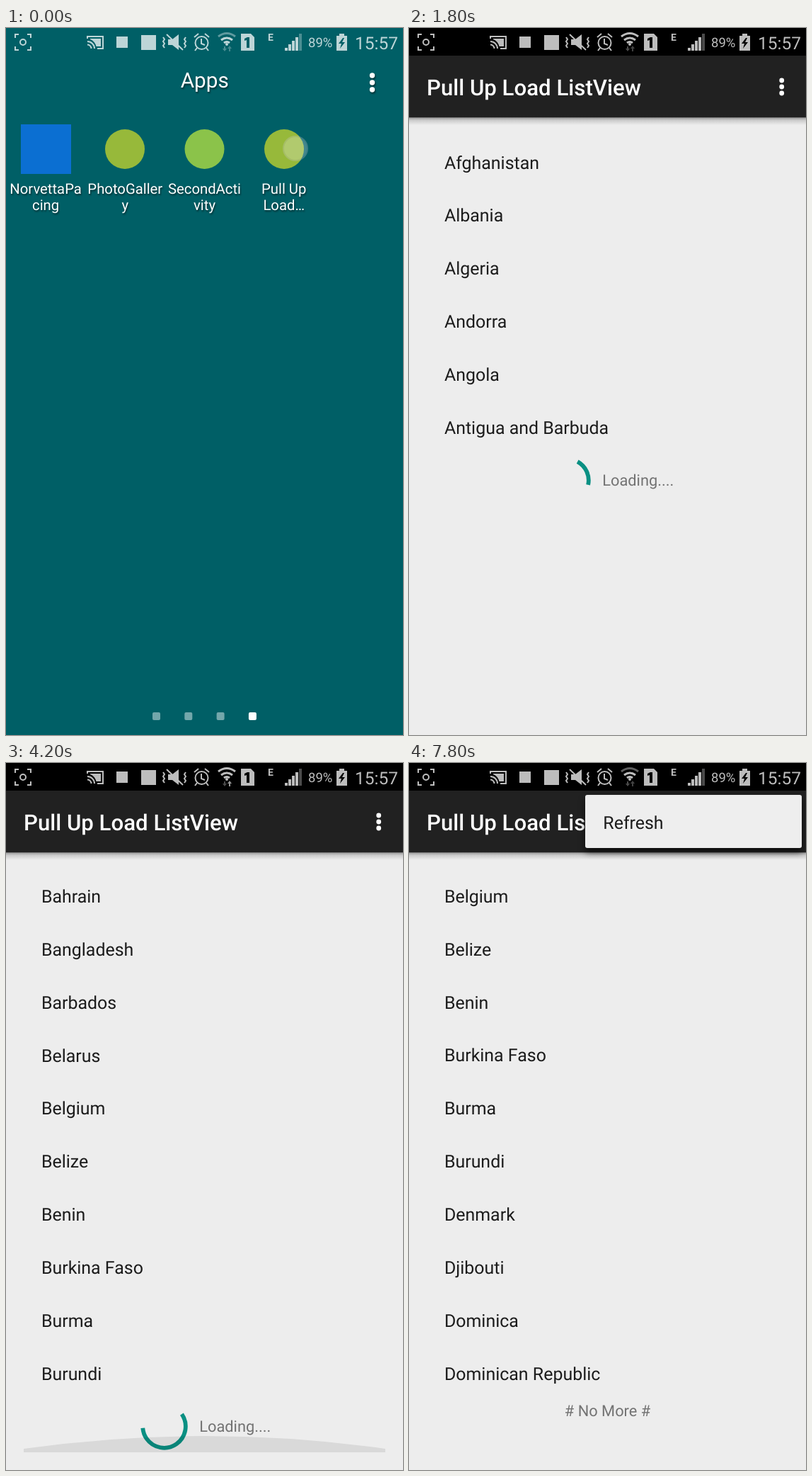
These frames come from a looping animation (561 px wide and 998 px high, 8 s). An HTML page:

```html
<!DOCTYPE html>
<html lang="en">
<head>
<meta charset="utf-8">
<title>Pull Up Load ListView</title>
<style>
  html, body { margin: 0; width: 100%; height: 100%; overflow: hidden; background: #005f66; }
  svg { display: block; }
  text { font-family: Roboto, sans-serif; white-space: pre; text-rendering: geometricPrecision; }
  #home text { fill: #fff; text-anchor: middle; font-size: 20.3px; }
  #home .shade { filter: drop-shadow(1px 2px 1px rgba(0, 0, 0, .5)); }
  #items text, #popup text { font-size: 24.95px; fill: #1c1c1c; }
  #footer text { font-size: 21.83px; fill: #737373; }
  #popup { filter: drop-shadow(0 6px 5px rgba(0, 0, 0, .6)); }
  #status { fill: #fff; stroke: none; opacity: .74; }
  #status .line { fill: none; stroke: #fff; stroke-width: 2; }
</style>
</head>
<body>
<svg width="561" height="998" viewBox="0 0 561 998">
  <defs>
    <linearGradient id="drop" x2="0" y2="1">
      <stop stop-opacity=".38"/><stop offset=".4" stop-opacity=".14"/><stop offset="1" stop-opacity="0"/>
    </linearGradient>
    <clipPath id="view"><path d="M25 151H536V973H25z"/></clipPath>
  </defs>

  <rect width="561" height="998" fill="#005f66"/>
  <g id="home">
    <g class="shade">
      <text x="280.700" y="83.500" style="font-size:29.7px">Apps</text>
      <g fill="#fff"><circle cx="517.500" cy="67" r="3.700"/><circle cx="517.500" cy="77" r="3.700"/><circle cx="517.500" cy="87" r="3.700"/></g>
      <g id="labels"></g>
    </g>
    <rect x="21" y="136" width="71" height="70" fill="#0b6fd2"/>
    <circle cx="168" cy="171" r="28" fill="#97b93a"/>
    <circle cx="280.500" cy="171" r="28" fill="#8bc34a"/>
    <circle cx="393" cy="171" r="28" fill="#97b93a"/>
    <g id="pages" fill="#fff"></g>
  </g>

  <g id="app">
    <rect width="561" height="1000" fill="#ededed"/>
    <g id="content">
      <g clip-path="url(#view)">
        <g id="items"></g>
        <g id="footer">
          <g id="loading">
            <circle id="spin" r="30.300" pathLength="1" fill="none" stroke="#0a9083" stroke-width="5.800"/>
            <text x="273.200" y="7.800">Loading....</text>
          </g>
          <text id="end" x="280.500" y="-14.200" text-anchor="middle"># No More #</text>
        </g>
        <path id="glow" d="M25 973V968Q280.500 932 536 968V973z" fill-opacity=".085"/>
      </g>
      <rect y="126" width="561" height="11" fill="url(#drop)"/>
      <rect y="39" width="561" height="87.300" fill="#212121"/>
      <svg x="493" y="39" width="68" height="87"><circle id="ripple" cx="34" cy="44" r="43" fill="#fff" fill-opacity=".2"/></svg>
      <text x="24.950" y="94.500" font-size="31.180" font-weight="500" fill="#fff">Pull Up Load ListView</text>
      <g fill="#fff"><circle cx="526.700" cy="74" r="3.400"/><circle cx="526.700" cy="83" r="3.400"/><circle cx="526.700" cy="92" r="3.400"/></g>
    </g>
    <rect width="561" height="39"/>
  </g>

  <g id="popup">
    <rect x="249" y="45" width="306" height="75" rx="3" fill="#eeeeee"/>
    <text x="274.300" y="92.500">Refresh</text>
  </g>

  <g id="status">
    <g class="line">
      <path d="M13 14V9h5M30 9h5v5M35 26v5h-5M18 31h-5v-5"/><circle cx="24" cy="20" r="4"/>
      <path d="M115 15V12H137V29H129M115 19a10 10 0 0 1 10 10M115 23.500a5.500 5.500 0 0 1 5.500 5.500"/>
      <path d="M222 13l2 3-2 3 2 3-2 3 2 3M254 13l-2 3 2 3-2 3 2 3-2 3M227 9L250 31"/>
      <circle cx="276.500" cy="21" r="9"/>
      <path d="M266 13l6-5M287 13l-6-5M276 15v7l5 2M270 28l-3 4M283 28l3 4"/>
      <path id="outer" d="M300 12q12-9 24 0" stroke-width="3"/>
      <path d="M304 17q8-6 16 0M308 21q4-3 8 0" stroke-width="3"/>
    </g>
    <path d="M119 15H134V26H127.500Q125.500 18.500 119 16z"/>
    <rect x="156" y="12" width="16" height="16"/>
    <rect x="191" y="10" width="21" height="21"/>
    <path d="M229 16h6l9-7v22l-9-7h-6z"/>
    <circle cx="312" cy="23" r="2"/>
    <path d="M309 33l-3-4h2v-3h2v3h2z" opacity=".4"/>
    <path id="up" d="M316 25l-3 4h2v4h2v-4h2z"/>
    <path fill-rule="evenodd" d="M332 8h14l5 5V32H332zM337 15l4-2h3V28h-4V17l-3 1z"/>
    <text x="370" y="18" font-size="14" font-weight="700">E</text>
    <path d="M394 28h4v4h-4zM399 23h4v9h-4zM404 18h4v14h-4zM409 13h4v19h-4z"/>
    <path d="M414 8h4v24h-4z" opacity=".4"/>
    <text x="427" y="27" font-size="18.500">89%</text>
    <path fill-rule="evenodd" d="M471 8h7v3h4V32H467V11h4zM476 14l-6 8h4l-2 7 7-9h-4l3-6z"/>
    <text x="493" y="30" font-size="24.500">15:57</text>
  </g>
  <circle id="touch" r="17" fill="#f8f8fa" fill-opacity=".9" stroke="#c8c8ce" stroke-width="2"/>
</svg>

<script>
const ROW = 74.85, FIRST = 189.5, LOOP = 8000;
const SCROLL_1 = 525.5, SCROLL_2 = SCROLL_1 + 4 * ROW;
const countries = ['Afghanistan', 'Albania', 'Algeria', 'Andorra', 'Angola', 'Antigua and Barbuda',
  'Bahamas, The', 'Bahrain', 'Bangladesh', 'Barbados', 'Belarus', 'Belgium', 'Belize', 'Benin',
  'Burkina Faso', 'Burma', 'Burundi', 'Denmark', 'Djibouti', 'Dominica', 'Dominican Republic'];
const labels = [['NorvettaPa', 'cing'], ['PhotoGaller', 'y'], ['SecondActi', 'vity'], ['Pull Up', 'Load…']];

const $ = id => document.getElementById(id);
const set = (id, attrs) => { for (const k in attrs) $(id).setAttribute(k, attrs[k]); };
const show = (id, on) => set(id, { visibility: on ? 'visible' : 'hidden' });
const clamp = x => Math.min(1, Math.max(0, x));

$('items').innerHTML = countries.map((c, i) => `<text x="49.900" y="${FIRST + 9 + i * ROW}">${c}</text>`).join('');
$('labels').innerHTML = labels.map((pair, i) => pair.map((s, j) =>
  `<text x="${56.1 + i * 112.2}" y="${234 + j * 23}">${s}</text>`).join('')).join('');
$('pages').innerHTML = [0, 1, 2, 3].map(i =>
  `<rect x="${207 + i * 45.3}" y="966" width="11" height="11" rx="2" opacity="${i < 3 ? 0.45 : 1}"/>`).join('');

// Piecewise linear track of time, value pairs
function track(t, ...keys) {
  for (let i = 2; i < keys.length; i += 2) {
    if (t < keys[i]) {
      const k = clamp((t - keys[i - 2]) / (keys[i] - keys[i - 2]));
      return keys[i - 1] + k * (keys[i + 1] - keys[i - 1]);
    }
  }
  return keys[keys.length - 1];
}

// cubic-bezier(.4, 0, .2, 1)
function ease(x) {
  let lo = 0, hi = 1;
  for (let i = 0; i < 20; i++) {
    const m = (lo + hi) / 2, n = 1 - m;
    if (1.2 * n * n * m + 0.6 * n * m * m + m * m * m < x) lo = m; else hi = m;
  }
  return 3 * (1 - lo) * lo * lo + lo ** 3;
}

function drawSpinner(age) {
  const cycles = age / 1333, u = cycles % 1;
  const start = 0.75 * ease(clamp(2 * u - 1));
  const end = 0.75 * ease(clamp(2 * u)) + 0.03;
  const angle = -90 + 360 * (start + u / 4) + 144 * cycles;
  set('spin', {
    'stroke-dasharray': `${end - start} 2`,
    transform: `translate(223.500 0) rotate(${angle})`
  });
}

function draw(t) {
  show('app', t >= 100);
  set('app', {
    transform: `translate(0 ${track(t, 100, 88, 200, 22, 300, 3, 400, 0)})`,
    opacity: track(t, 100, 0.985, 200, 1)
  });
  set('content', { opacity: track(t, 100, 0.37, 200, 0.85, 300, 1) });

  const count = t < 1700 ? 0 : t < 2800 ? 6 : t < 5500 ? 17 : 21;
  const scroll = track(t, 3700, 0, 3800, 210, 3900, 480, 4000, SCROLL_1,
    5900, SCROLL_1, 6000, 590, 6100, 740, 6200, SCROLL_2);
  [...$('items').children].forEach((el, i) => el.setAttribute('visibility', i < count ? 'inherit' : 'hidden'));
  set('items', { transform: `translate(0 ${-scroll})` });
  set('footer', { transform: `translate(0 ${FIRST + count * ROW - scroll})` });
  set('loading', { display: count < 21 ? 'inline' : 'none' });
  set('end', { display: count < 21 ? 'none' : 'inline' });

  const born = t < 1700 ? 150 : t < 3800 ? 1635 : 3885;
  set('spin', { display: t > born ? 'inline' : 'none' });
  drawSpinner(Math.max(0, t - born));

  const glow = t < 5000 ? track(t, 3900, 0, 4000, 0.5, 4100, 1, 4200, 1, 4500, 0)
    : track(t, 6100, 0, 6200, 0.4, 6300, 0);
  set('glow', { opacity: glow, transform: `translate(0 ${973 * (1 - glow)}) scale(1 ${glow})` });

  const open = track(t, 7300, 0, 7400, 0.4, 7500, 0.8, 7600, 1);
  show('popup', open > 0);
  set('popup', { opacity: open, transform: `translate(555 45) scale(${0.8 + 0.2 * open}) translate(-555 -45)` });
  show('ripple', t >= 7300 && t < 7800);
  set('outer', { opacity: t < 1000 || t >= 6800 ? 0.5 : 1 });
  set('up', { opacity: t >= 4200 && t < 6300 ? 0.8 : 0.35 });

  const second = t >= 5500;
  show('touch', t < 100 || t >= 2900 && t < 3900 || second && t < 6100);
  set('touch', {
    opacity: t < 100 ? 0.3 : 1,
    cx: t < 100 ? 409 : second ? 360 : 372,
    cy: t < 100 ? 170 : second ? track(t, 5900, 833, 6000, 769) : track(t, 3700, 768, 3800, 558)
  });
}

function frame() {
  const t = performance.now() % LOOP;
  draw(Math.floor(t / 100) * 100);
  requestAnimationFrame(frame);
}
frame();
</script>
</body>
</html>
```
